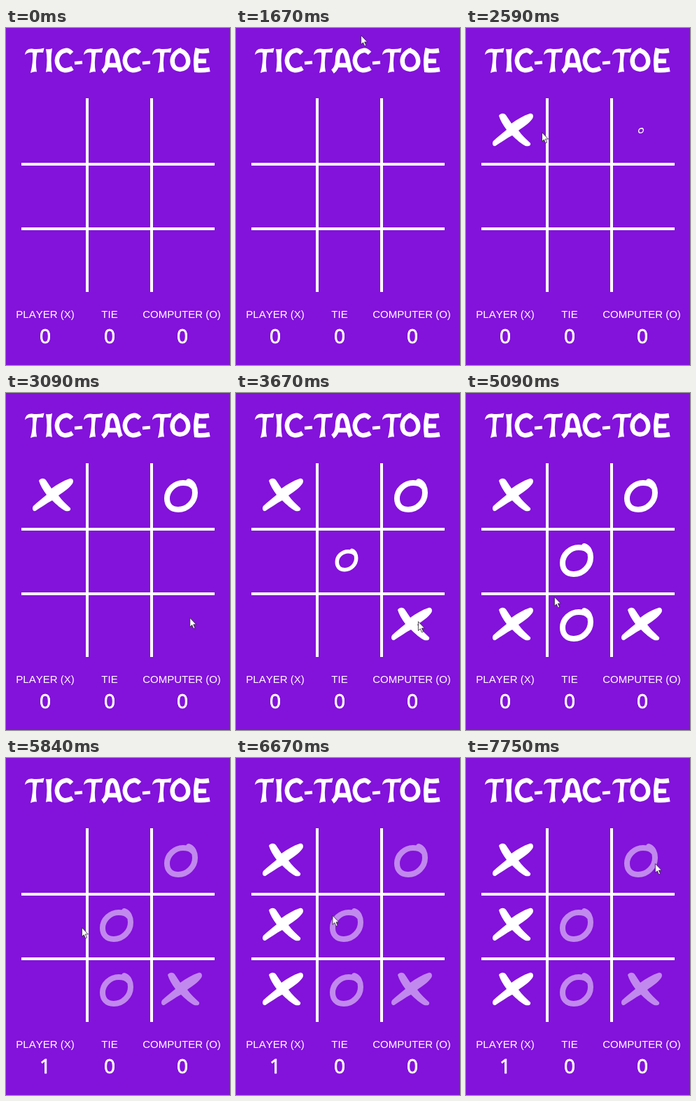
These frames come from a looping animation (320x480 px, 8000 ms). An HTML page:

```html
<!DOCTYPE html>
<html lang="en">
<head>
<meta charset="utf-8">
<title>Tic-Tac-Toe</title>
<style>
html, body { margin: 0; width: 100%; height: 100%; overflow: hidden; background: #8312db; }
svg { display: block; width: 320px; height: 480px; }
text { fill: #fff; text-anchor: middle; }
.label { font: 15px "Liberation Sans", Arial, sans-serif; font-kerning: none; }
.score { font: 28px "Open Sans", "Noto Sans", sans-serif; stroke: #fff; stroke-width: .9; }
.line { fill: none; stroke: #fff; stroke-width: 6.5; }
</style>
</head>
<body>
<svg viewBox="0 0 320 480">
  <defs>
    <path id="T" fill="#fff" d="M1 38.500Q2 29 11 29.500Q20 31 28.500 28.500L27 35Q22 34.500 18.500 35Q15.500 49 18 62.500Q14 61.500 9 64Q13 49 12 35Q5 34 1 38.500Z"/>
    <path id="C" class="line" d="M94 36Q89 31 85 32C74 34 71 45 74 52C78 62 87 62 95 57"/>
    <path id="X" fill="#fff" d="M-20-20C-19-23-13-25-10-21L-2-9C6-15 15-20 24-23C29-24 30-19 28-16C23-9 15-4 8 1C13 8 19 13 25 19C26 23 22 24 18 23C12 20 5 14-1 8C-9 12-17 18-25 23C-29 24-30 19-28 16C-22 10-15 5-9 0C-14-7-18-13-20-20Z"/>
    <path id="O" fill="none" stroke="#fff" stroke-width="8" stroke-linecap="round" stroke-linejoin="round" d="M11-20C17-18 20-11 20-4C20 9 9 20-4 20C-15 20-20 13-20 4C-20-8-9-18 3-18C10-18 15-16 18-12"/>
  </defs>
  <rect width="320" height="480" fill="#8312db"/>
  <g role="img" aria-label="TIC-TAC-TOE">
    <use href="#T" x="26"/><use href="#T" x="110"/><use href="#T" x="208"/>
    <path fill="#fff" d="M57 30Q62 31 66 29Q63 46 66 63Q61 61 57 63Q60 46 57 30Z"/>
    <use href="#C"/><use href="#C" x="97"/>
    <path stroke="#fff" stroke-width="4.500" d="M98 50L109 49M195 50L206 49"/>
    <path class="line" d="M138 62Q144 58 145 48C145 37 148 32 152 32C160 32 159 54 164 62M145 53H160"/>
    <path class="line" d="M251 31C238 35 237 45 238 50C240 62 257 62 260 50C261 42 257 33 246 32"/>
    <path class="line" d="M290 32Q280 34 273 32Q270 47 272 60Q281 61 291 59M272 47H286"/>
  </g>
  <path stroke="#fff" stroke-width="4" d="M116 100V376M208 100V376M22 194H298M22 286H298"/>
  <g id="marks"></g>
  <g class="label">
    <text x="56" y="413">PLAYER (X)</text>
    <text x="148" y="413">TIE</text>
    <text x="251" y="413">COMPUTER (O)</text>
  </g>
  <g class="score">
    <text id="wins" x="56" y="449">0</text>
    <text x="148" y="449">0</text>
    <text x="252" y="449">0</text>
  </g>
  <path id="cursor" fill="#fff" stroke="#222" stroke-width=".8" d="M.4.600V13.500L3.300 10.800L5.500 15.800L7.600 14.900L5.400 10H9.400Z"/>
</svg>
<script>
const LOOP = 8000, STEP = 1000 / 12, WIN = 5560;
const $ = id => document.getElementById(id);

// shape, centre, start time, part of the winning column
const moves = [
  ['X', 67, 145, 2240, true],
  ['O', 250, 146, 2570, false],
  ['X', 251, 329, 3280, false],
  ['O', 158, 238, 3612, false],
  ['X', 67, 329, 4310, true],
  ['O', 158, 330, 4650, false],
  ['X', 67, 237, 5240, true],
].map(([shape, x, y, start, wins]) => {
  const node = document.createElementNS('http://www.w3.org/2000/svg', 'use');
  node.setAttribute('href', '#' + shape);
  $('marks').append(node);
  return { node, x, y, start, wins };
});

// time, x, y of the pointer tip
const path = [
  [1660, 180, 8], [2080, 69, 129], [2330, 69, 129], [2583, 108, 148],
  [3000, 265, 314], [3160, 260, 325], [3830, 260, 325], [4250, 100, 320],
  [4650, 100, 320], [5083, 126, 290], [5240, 108, 241], [6500, 108, 241],
  [7333, 256, 155], [7580, 290, 124], [7750, 270, 150],
];

const clamp = v => Math.max(0, Math.min(1, v));
const mix = (a, b, k) => a + (b - a) * k;
const ramp = (t, from, to) => clamp((t - from) / (to - from));

// grows past full size, then settles
function pop(t) {
  return t < 110 ? 1.38 * clamp(t / 110) : mix(1.38, 1, ramp(t, 110, 215));
}

function pointer(t) {
  const i = path.findIndex(p => p[0] > t);
  if (i < 0) return path[path.length - 1].slice(1);
  const a = path[Math.max(0, i - 1)], b = path[i], k = ramp(t, a[0], b[0]);
  return [mix(a[1], b[1], k), mix(a[2], b[2], k)];
}

function draw(t) {
  const out = ramp(t, WIN - 40, WIN + 250), back = ramp(t, 5840, 6080);
  for (const { node, x, y, start, wins } of moves) {
    node.setAttribute('transform', `translate(${x} ${y}) scale(${pop(t - start)})`);
    node.setAttribute('opacity', t < start ? 0 : wins ? 1 - out + back : 1 - out / 2);
  }
  $('wins').textContent = t < WIN ? 0 : 1;
  $('cursor').setAttribute('transform', `translate(${pointer(t)})`);
  $('cursor').setAttribute('visibility', t < path[0][0] ? 'hidden' : 'visible');
}

const begin = performance.now();
function tick() {
  const t = (performance.now() - begin) % LOOP;
  draw(Math.floor(t / STEP) * STEP);
  requestAnimationFrame(tick);
}
tick();
</script>
</body>
</html>
```
